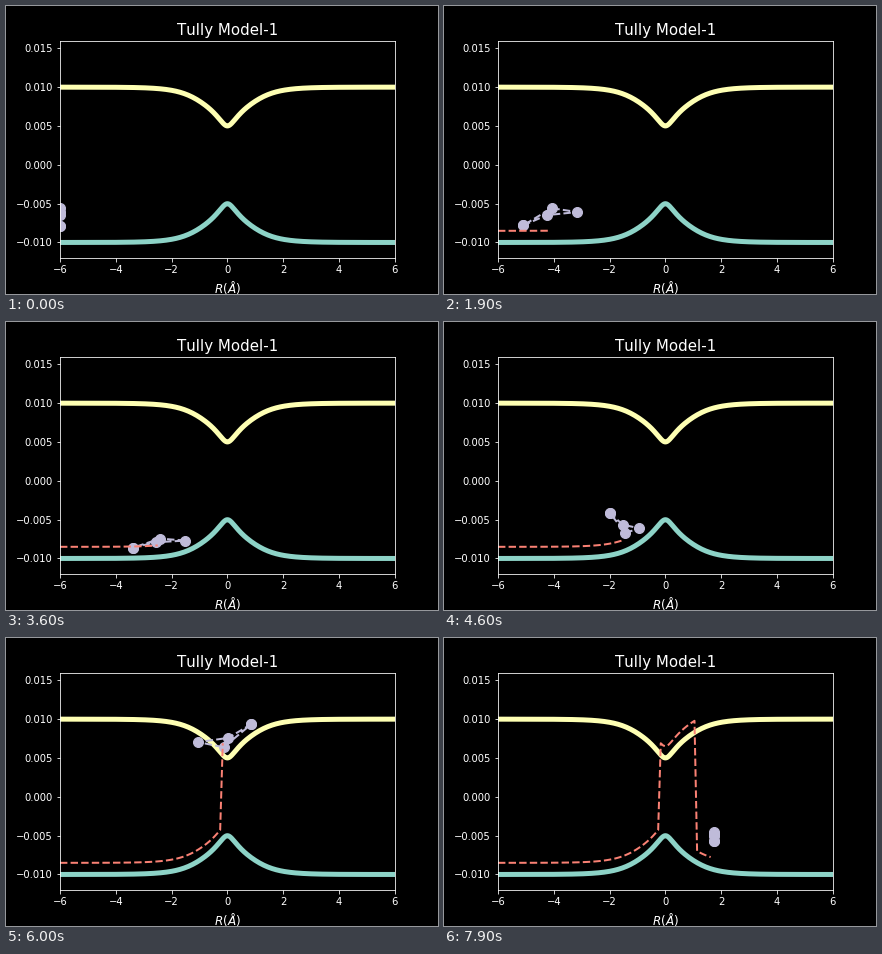
These frames come from a looping animation (432x288 px, 8000 ms). A matplotlib script:

```python
import numpy as np
import matplotlib.pyplot as plt
from matplotlib.animation import FuncAnimation

plt.style.use("dark_background")
plt.rcParams.update({"font.family": "DejaVu Sans", "font.size": 10,
                     "text.kerning_factor": 6})

FRAMES, INTERVAL = 80, 100
HOP_UP, HOP_DOWN = 60, 74     # surface hops
START = -6.0
FAST, SLOW = 0.0973, 0.093    # step per frame on the lower and upper surface
TRAIL_LIFT = 0.0015

# Ring of four beads: each mode is a fixed shape times an amplitude
STRETCH_SHAPE = np.array([-1, -.13, 1, .05])
TILT_SHAPE = np.array([-.77, 0, .24, .53])
FLIPS = [0, 51, 79]           # times at which the ring turns inside out
KEYS = [0, 19, 36, 46, 60, 68, 79]
LIFT = [3.5, 3.5, 1.9, 3.5, 2.2, 3.6, 4.2]
TILT = [1.8, 1.7, .9, -2, -2.3, 2.4, .9]


def surface(r):
    """Upper adiabatic energy; the lower one is its negative."""
    diabatic = 0.01 * (1 - np.exp(-1.6 * np.abs(r)))
    coupling = 0.005 * np.exp(-r**2)
    return np.hypot(diabatic, coupling)


def eased(t, values):
    """Cosine easing between the key times."""
    pos = np.interp(t, KEYS, np.arange(len(KEYS)))
    s = (1 - np.cos(np.pi * (pos % 1))) / 2
    return np.interp(np.floor(pos) + s, np.arange(len(KEYS)), values)


t = np.arange(FRAMES)
on_upper = (t >= HOP_UP) & (t < HOP_DOWN)
steps = np.where((t >= HOP_UP) & (t <= HOP_DOWN), SLOW, FAST)
center = START + np.cumsum(steps) - steps[0]
energy = np.where(on_upper, 1, -1) * surface(center)

phase = np.pi * np.interp(t, FLIPS, [0, 1, 2])
stretch = 1.03 * np.tanh(1.9 * np.sin(phase))
bead_x = (center + 0.0013 * t)[:, None] + np.outer(stretch, STRETCH_SHAPE)
bead_y = (energy + 1e-3 * eased(t, LIFT))[:, None] \
    + 1e-3 * np.outer(eased(t, TILT), TILT_SHAPE)

fig, ax = plt.subplots(figsize=(6, 4), dpi=72)
fig.subplots_adjust(left=0.125, right=0.9, bottom=0.125, top=0.88)

r = np.linspace(-6, 6, 241)
ax.plot(r, -surface(r), lw=5, color="#8dd3c7")
ax.plot(r, surface(r), lw=5, color="#feffb3")
beads, = ax.plot([], [], "o--", lw=2, ms=10, color="#bfbbd9")
trail, = ax.plot([], [], "--", lw=2, color="#fa8174")

ax.set_xlim(-6, 6)
ax.set_ylim(-0.012, 0.016)
ax.set_title("Tully Model-1", fontsize=15)
ax.set_xlabel(r"$R(\AA)$", fontsize=12)


def update(n):
    ring = [0, 1, 2, 3, 0]
    beads.set_data(bead_x[n, ring], bead_y[n, ring])
    trail.set_data(center[:n + 1], energy[:n + 1] + TRAIL_LIFT)
    return beads, trail


anim = FuncAnimation(fig, update, frames=FRAMES, interval=INTERVAL,
                     repeat=True, repeat_delay=0)
plt.show()
```
